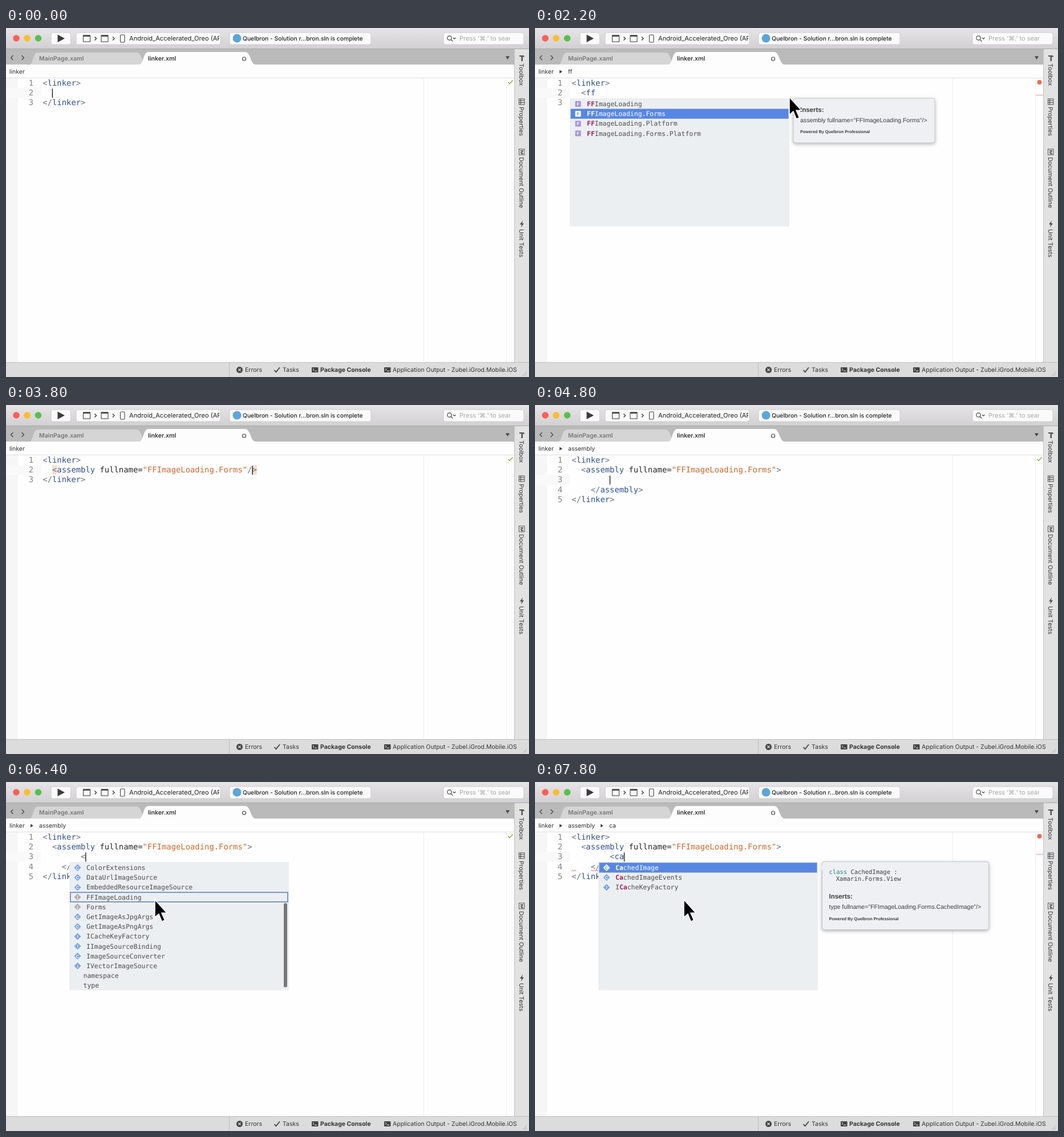
Write an HTML page that moves like this. It is 917 by 611 pixels and loops after 8000 ms.

```html
<!DOCTYPE html>
<html lang="en">
<head>
<meta charset="utf-8">
<title>Linker editor</title>
<style>
  html, body { margin: 0; width: 100%; height: 100%; overflow: hidden; background: #fefefe; }
  svg { display: block; width: 100%; height: 100%; }
  text { font: 10.5px Inter, sans-serif; fill: #333; text-rendering: geometricPrecision; }
  .bold { font-weight: 700; }
  .code { font: 13.87px "DejaVu Sans Mono", monospace; fill: #262626; }
  .num { fill: #858585; text-anchor: end; }
  .mark { fill: #66727c; }
  .tag { fill: #304f8c; }
  .str { fill: #c9682c; }
  .row { font: 11.46px "DejaVu Sans Mono", monospace; fill: #4c4c4c; }
  .hit { font-weight: 700; fill: #a3235f; }
  .on, .on .hit { fill: #fff; }
  .glyph { font: bold 7.5px "Liberation Sans", sans-serif; text-anchor: middle; fill: #fff; }
  .tip { font: 10.55px "Liberation Sans", sans-serif; fill: #3c3c3c; }
  .head { font-size: 11.5px; font-weight: 700; }
  .foot { font-size: 7.3px; font-weight: 700; }
  .doc { font: 10.5px "DejaVu Sans Mono", monospace; fill: #3c3c3c; }
  .line { fill: none; stroke: #444; stroke-width: 1.2; }
</style>
</head>
<body>
<svg viewBox="0 0 917 611" preserveAspectRatio="none">
  <defs>
    <linearGradient id="bar" x2="0" y2="1">
      <stop stop-color="#e6e4e6"/><stop offset="1" stop-color="#d2d0d2"/>
    </linearGradient>
    <filter id="shade" x="-10%" y="-20%" width="120%" height="150%">
      <feDropShadow dx="0" dy="2" stdDeviation="3" flood-opacity=".3"/>
    </filter>
    <clipPath id="device"><path d="M123 8H374V29H123z"/></clipPath>
    <clipPath id="search"><path d="M767 8H884V29H767z"/></clipPath>
    <clipPath id="list"><path d="M111 140H496V364H111z"/></clipPath>
  </defs>
  <g id="chrome"></g>
  <g id="scene"></g>
</svg>
<script>
const LOOP = 8000, STEP = 200;
const CODE_X = 64.3, CHAR = 8.35, LINE = 17.2;

const esc = s => s.replace(/&/g, '&amp;').replace(/</g, '&lt;').replace(/>/g, '&gt;');
const text = (x, y, s, cls = '', more = '') => `<text x="${x}" y="${y}" class="${cls}" ${more}>${esc(s)}</text>`;
const rect = (x, y, w, h, fill, more = '') => `<rect x="${x}" y="${y}" width="${w}" height="${h}" fill="${fill}" ${more}/>`;
const path = (d, fill, more = '') => `<path d="${d}" fill="${fill}" ${more}/>`;
const line = (d, more = '') => `<path d="${d}" class="line" ${more}/>`;
const dot = (x, y, r, fill, more = '') => `<circle cx="${x}" cy="${y}" r="${r}" fill="${fill}" ${more}/>`;
const span = (cls, s) => s ? `<tspan class="${cls}">${esc(s)}</tspan>` : '';

function toolbar() {
  const field = (x, w) => rect(x, 8, w, 21, '#fbfafb', 'rx="3.5" stroke="#c6c4c6" stroke-width=".8"');
  const windowIcon = x => rect(x, 13, 12, 11, 'none', 'stroke="#444" stroke-width="1.1"') + rect(x, 12.5, 12, 2.5, '#444');
  return rect(0, 0, 917, 36, 'url(#bar)') + rect(0, 36, 917, 1, '#aaa') +
    dot(18, 18, 5.8, '#f95f57') + dot(37, 18, 5.8, '#f9bd2f') + dot(56.5, 18, 5.8, '#55c24b') +
    field(79, 34.5) + path('M90.5 11.5L103 18.3 90.5 25z', '#3b3b3b') +
    field(123, 253) + windowIcon(135.5) + windowIcon(167) +
    line('M155.5 15.5l3 3-3 3M187 15.5l3 3-3 3', 'style="stroke-width:1.5"') +
    rect(200.5, 12, 7.5, 13, 'none', 'rx="1.5" stroke="#444" stroke-width="1.1"') +
    `<g clip-path="url(#device)">${text(216, 22.3, 'Android_Accelerated_Oreo (API 27)', '', 'style="font-size:11.1px;fill:#222"')}</g>` +
    field(392, 248) + dot(405, 18, 7.5, '#5aa6dc') +
    text(415, 22.2, 'Quelbron - Solution r...bron.sln is complete', '', 'style="font-size:10.3px;font-weight:500;fill:#222"') +
    field(767, 141) + dot(777.5, 17.5, 3.7, 'none', 'class="line"') +
    line('M780.3 20.5l3.2 3.2M784 17l2.2 2.2 2.2-2.2') +
    `<g clip-path="url(#search)">${text(795, 22.3, 'Press ‘⌘.’ to search', '', 'style="font-size:11px;fill:#a8a8a8"')}</g>`;
}

function tabs() {
  return rect(0, 37, 917, 27, '#bababa') +
    path('M42 64C48 62 47 43 56 43H229C238 43 238 62 244 64z', '#d5d5d5') +
    path('M234 64C242 62 240 42 250 42H419C429 42 428 62 437 64z', '#fdfdfd') +
    line('M12.5 48l-4 4 4 4M27.5 48l4 4-4 4') +
    text(58, 57.3, 'MainPage.xaml', 'bold', 'style="font-size:10.6px;font-weight:600;fill:#777"') +
    text(249, 57.3, 'linker.xml', 'bold', 'style="font-size:10.6px;font-weight:600"') +
    dot(417.5, 54, 3, 'none', 'class="line"') + path('M876 49.5H883L879.5 55z', '#444');
}

function sidebar() {
  const label = (y, s) => text(0, 0, s, '', `transform="translate(900 ${y}) rotate(90)"`);
  const frame = y => rect(899.5, y, 9.5, 10, 'none', 'stroke="#555"');
  return rect(891, 37, 26, 549, '#e2e2e2') + rect(891, 37, 1, 549, '#c2c2c2') +
    path('M900 48h8l1 3h-1l-2-1v8h-2.5v-8H900z', '#505050') + label(62, 'Toolbox') +
    frame(124) + line('M899.5 127h9M899.5 130.5h9M902.5 124v10', 'style="stroke-width:1"') + label(138, 'Properties') +
    frame(212) + line('M902 215h5M902 218h2v2h3M905 215v3', 'style="stroke-width:1.3"') + label(226, 'Document Outline') +
    path('M906 337l-5 7h3l-1 5 5-7h-3z', '#505050') + label(352, 'Unit Tests');
}

function statusBar() {
  const console = x => rect(x, 594, 11.5, 9, '#444', 'rx="1"') + line(`M${x + 2} 596l2 2-2 2M${x + 5} 600.5h4`, 'style="stroke:#eee;stroke-width:1"');
  return rect(0, 585, 917, 26, '#dcdcdc') + rect(0, 585, 917, 1, '#bdbdbd') + rect(391, 586, 1, 25, '#bdbdbd') +
    dot(409.5, 598.5, 5.5, '#444') + line('M407.3 596.3l4.4 4.4M411.7 596.3l-4.4 4.4', 'style="stroke:#eee"') +
    text(419, 602.3, 'Errors') + line('M470.5 599l3 3.3 6.5-8', 'style="stroke-width:1.8"') + text(485, 602.3, 'Tasks') +
    console(536) + text(551, 602.3, 'Package Console', 'bold') +
    console(663) + text(678, 602.3, 'Application Output - Zubel.iGrod.Mobile.iOS') +
    line('M906 609l7-7M910 609l3-3', 'style="stroke:#aaa;stroke-width:1"');
}

document.getElementById('chrome').innerHTML =
  rect(0, 0, 917, 611, '#fefefe') + rect(0, 88, 21, 497, '#f6f6f6') +
  rect(732, 88, 1, 497, '#ededed') + rect(877, 88, 1, 497, '#f0f0f0') +
  toolbar() + tabs() + rect(0, 64, 891, 23, '#fdfdfd') + rect(0, 87, 891, 1, '#dedede') + sidebar() + statusBar();

const ASSEMBLY = '  <assembly fullname="FFImageLoading.Forms"';
const OPEN = '<linker>', CLOSE = '</linker>';
const single = s => [OPEN, s, CLOSE];
const nested = s => [OPEN, ASSEMBLY + '>', '        ' + s, '    </assembly>', CLOSE];

const LIBS = ['', '.Forms', '.Platform', '.Forms.Platform'].map(s => 'F:FFImageLoading' + s);
const TYPES = ['-:!--', '-:![CDATA[', '-:/assembly', 'C:CachedImage', 'C:CachedImageEvents', 'C:CacheType',
  'C:ColorExtensions', 'C:DataUrlImageSource', 'C:EmbeddedResourceImageSource', 'N:FFImageLoading', 'N:Forms',
  'C:GetImageAsJpgArgs', 'C:GetImageAsPngArgs', 'I:ICacheKeyFactory', 'I:IImageSourceBinding',
  'C:ImageSourceConverter', 'I:IVectorImageSource', '-:namespace', '-:type'];
const MATCHES = ['C:CachedImage', 'C:CachedImageEvents', 'I:ICacheKeyFactory'];

const libs = (pick, typed) => ({ x: 61, y: 123, items: LIBS, pick, typed });
const types = (pick, scroll) => ({ x: 111, y: 140, items: TYPES, pick, scroll, outline: true, typed: '' });
const matches = typed => ({ x: 111, y: 140, items: MATCHES, pick: 0, typed });
const libTip = (name, w) => ({ x: 453, y: 123, w, h: 78, insert: `assembly fullname="${name}"/>` });
const typeTip = { x: 503.5, y: 139.5, w: 292, h: 119, doc: true, insert: 'type fullname="FFImageLoading.Forms.CachedImage"/>' };

// Each step changes only the listed parts; a new "caret" [line, column] restarts its blink.
const STEPS = [
  [0, { lines: single(''), caret: [1, 2], crumbs: ['linker'] }],
  [1000, { lines: single('  <'), caret: [1, 3] }],
  [1200, { lines: single('  <f'), caret: [1, 4], list: libs(0, 'f'), mouse: [446, 121] }],
  [1400, { lines: single('  <ff'), caret: [1, 5], list: libs(0, 'ff'), tip: libTip('FFImageLoading', 214) }],
  [1800, { crumbs: ['linker', 'ff'], error: 117 }],
  [2000, { list: libs(1, 'ff'), tip: libTip('FFImageLoading.Forms', 248) }],
  [2800, { lines: single(ASSEMBLY + '/>'), caret: [1, 45], list: null, tip: null, mouse: null }],
  [3200, { crumbs: ['linker'], error: 0 }],
  [3600, { caret: [1, 44], braces: [2, 44] }],
  [4000, { lines: single(ASSEMBLY + '>'), caret: [1, 43], braces: [2, 43] }],
  [4200, { lines: single(ASSEMBLY), caret: [1, 43], braces: null }],
  [4400, { lines: single(ASSEMBLY + '></assembly>'), caret: [1, 44], crumbs: ['linker', 'assembly'] }],
  [4800, { lines: nested(''), caret: [2, 8] }],
  [5400, { lines: nested('<'), caret: [2, 9], list: types(0, 0) }],
  [5600, { list: types(18, 105.2) }],
  [6200, { list: types(18, 103.2), mouse: [261, 206] }],
  [6400, { list: types(9, 103.2) }],
  [6600, { lines: nested('<c'), caret: [2, 10], list: matches('c') }],
  [6800, { lines: nested('<ca'), caret: [2, 11], list: matches('ca') }],
  [7000, { tip: typeTip }],
  [7200, { crumbs: ['linker', 'assembly', 'ca'], error: 126, squiggle: true }]
];

function stateAt(time) {
  const state = {};
  for (const [at, change] of STEPS) {
    if (at > time) break;
    Object.assign(state, change);
    if (change.caret) state.typedAt = at;
  }
  return state;
}

const highlight = s => s.replace(/("[^"]*")|(<\/?)(\w*)|(\/?>)|[^"<>\/]+/g,
  (all, str, open, tag, close) => str ? span('str', str) : open ? span('mark', open) + span('tag', tag) : close ? span('mark', close) : esc(all));

function codeLine(s, i) {
  const y = 101 + i * LINE, indent = s.length - s.trimStart().length;
  return text(48, y, String(i + 1), 'code num') +
    `<text x="${CODE_X + indent * CHAR}" y="${y}" class="code">${highlight(s.trim())}</text>`;
}

function crumbBar(names) {
  const at = [6, 58, 130];
  return names.map((name, i) => text(at[i], 80, name) +
    (i ? path(`M${at[i] - 15} 73.5l5 3-5 3z`, '#444') : '')).join('');
}

function icon(kind, x, y, on) {
  if (kind === '-') return '';
  const square = kind === 'F', blue = '#5787e3';
  const fill = on ? '#fff' : square ? '#a993d8' : kind === 'N' ? '#adadb1' : '#78a5e8';
  const shape = square ? rect(x - 5, y - 5, 10, 10, fill, 'rx="1"')
    : path(`M${x} ${y - 6}l6 6-6 6-6-6z`, fill, 'stroke-linejoin="round"');
  return shape + text(x, y + 2.7, kind === 'N' ? '{' : kind, 'glyph', on ? `style="fill:${blue}"` : '');
}

function popup({ x, y, items, pick, typed, scroll = 0, outline }) {
  const rows = items.map((item, i) => {
    const [kind, name] = item.split(':'), mid = y + 10 + i * LINE - scroll;
    const on = i === pick && !outline, from = typed ? name.toLowerCase().indexOf(typed) : 0, to = from + typed.length;
    const left = x + (kind === '-' ? 24.5 : 30);
    const box = i !== pick ? '' : outline
      ? rect(x + 2, mid - 8.3, 381, 16.5, 'none', 'stroke="#5f82bd" stroke-width="1.6"')
      : rect(x + 1.5, mid - 8.7, 382, 17.3, '#5787e3');
    return box + icon(kind, x + 14.5, mid, on) +
      `<text x="${left}" y="${mid + 4}" class="row ${on ? 'on' : ''}">${esc(name.slice(0, from))}${span('hit', name.slice(from, to))}${esc(name.slice(to))}</text>`;
  }).join('');
  const thumb = outline ? rect(x + 376, y + 1.5 + scroll * .685, 6, 147, '#777', 'rx="2"') : '';
  return rect(x, y, 385, 224.5, '#eceff2') + `<g ${outline ? 'clip-path="url(#list)"' : ''}>${rows}${thumb}</g>`;
}

function tooltip({ x, y, w, h, insert, doc }) {
  const left = x + 12, base = y + (doc ? 64.5 : 23.5);
  const body = rect(x, y, w, h, '#eef0f3', 'rx="4" stroke="#b9bcc0" stroke-width=".8" filter="url(#shade)"') +
    path(`M${x + .5} ${y + 6}l-5 4.5 5 4.5z`, '#eef0f3');
  const intro = doc
    ? `<text x="${left}" y="${y + 21.5}" class="doc"><tspan style="fill:#28808c">class</tspan> CachedImage :</text>` +
      text(left + 12.3, y + 33.7, 'Xamarin.Forms.View', 'doc') : '';
  return body + intro + text(left, base, 'Inserts:', 'tip head') + text(left, base + 18, insert, 'tip') +
    text(left, base + 37.7, 'Powered By Quelbron Professional', 'tip foot');
}

const pointer = ([x, y]) => path(`M${x} ${y}v31l6.8-6 5.5 13.2 5.2-2.2-5.5-12.7h9z`, '#050505', 'stroke="#fff" stroke-width="1.5"');

const wave = (x0, x1, y) => {
  let d = `M${x0} ${y}`;
  for (let x = x0, up = true; x < x1; x += 2, up = !up) d += `l2 ${up ? -2 : 2}`;
  return line(d, 'style="stroke:#e0616b;stroke-width:1"');
};

function render(time) {
  const s = stateAt(time), [row, col] = s.caret, top = 88 + row * LINE;
  const shown = Math.floor((time - s.typedAt) / 500) % 2 === 0;
  return rect(0, top, 61, LINE, '#f9f9f9') + crumbBar(s.crumbs) +
    (s.braces || []).map(c => rect(CODE_X + c * CHAR, top + .5, CHAR, 16, '#f5ddd0')).join('') +
    s.lines.map(codeLine).join('') +
    (shown ? rect(CODE_X + col * CHAR - .3, top + 1, 1.3, 16, '#111') : '') +
    (s.squiggle ? wave(64, 72, 156) + wave(98, 112, 156) : '') +
    (s.error ? dot(884.5, 95, 4, '#ef6a55') + rect(878, s.error, 13, 1.2, '#eba49b')
      : line('M880.5 95l2.5 2.5 5.5-6', 'style="stroke:#8fb53c;stroke-width:1.6"')) +
    (s.list ? popup(s.list) : '') + (s.tip ? tooltip(s.tip) : '') + (s.mouse ? pointer(s.mouse) : '');
}

const scene = document.getElementById('scene');
const start = performance.now();
let last = -1;
function tick() {
  const elapsed = (performance.now() - start) % LOOP;
  const time = Math.floor(elapsed / STEP) * STEP;
  if (time !== last) scene.innerHTML = render(last = time);
  requestAnimationFrame(tick);
}
tick();
</script>
</body>
</html>
```
